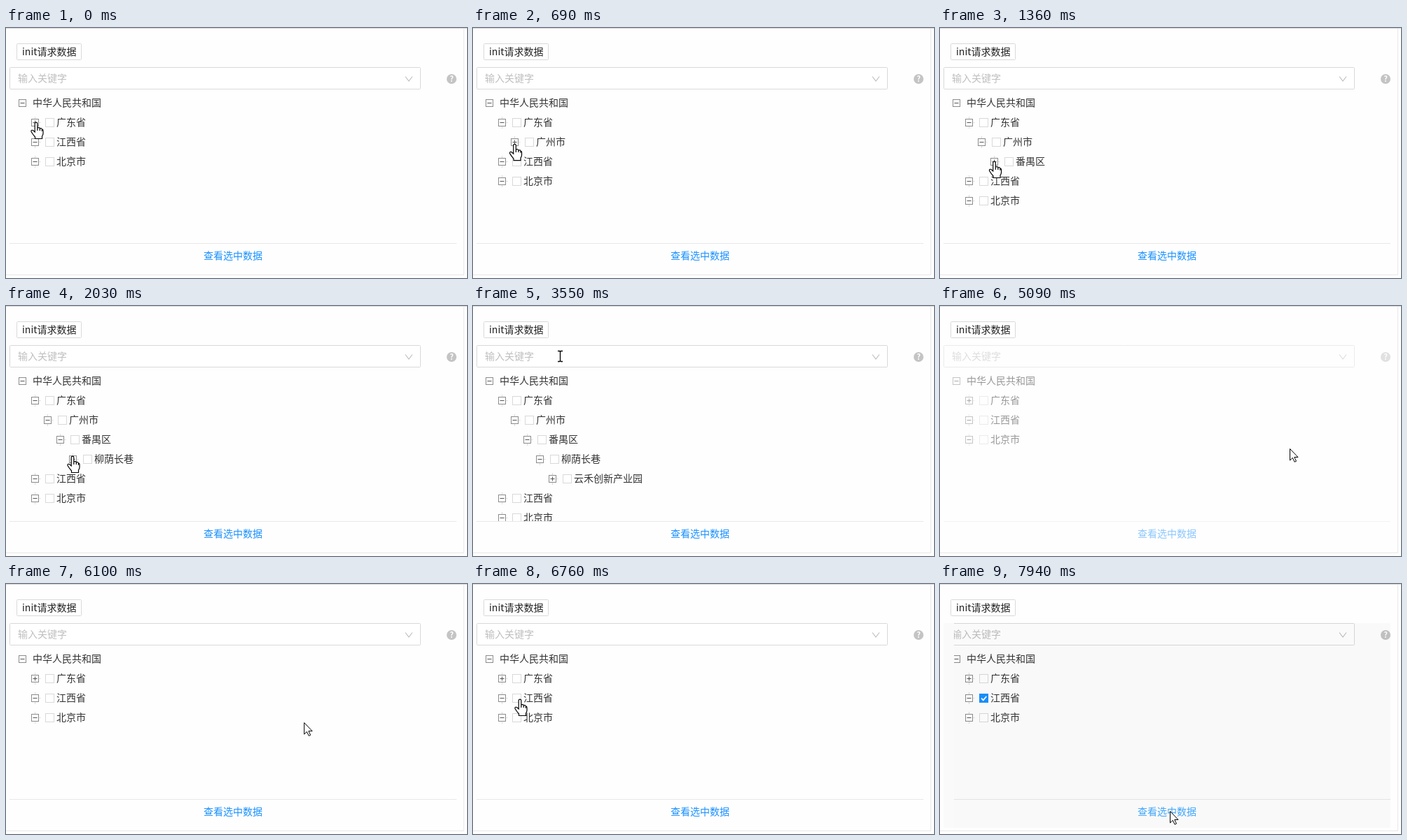
These frames come from a looping animation (658 px wide and 358 px high, 8 s). An HTML page:

```html
<!DOCTYPE html>
<html lang="zh-CN">
<head>
<meta charset="utf-8">
<style>
html, body { margin: 0; width: 100%; height: 100%; overflow: hidden; background: #fefefe; }
svg { display: block; }
text { font: 14px "Noto Sans CJK SC", "Noto Sans CJK", sans-serif; }
</style>
</head>
<body>
<svg id="stage" width="658" height="358"></svg>
<script>
const LOOP = 8000, RESET = 4940, ROW = 28;
const stage = document.getElementById('stage');

// label, depth, time it appears, time its own children appear
const nodes = [
  ['中华人民共和国', 0, -999, -999],
  ['广东省', 1, -999, 130],
  ['广州市', 2, 130, 760],
  ['番禺区', 3, 760, 1620],
  ['柳荫长巷', 4, 1620, 2430],
  ['云禾创新产业园', 5, 2430, Infinity],
  ['江西省', 1, -999, -999],
  ['北京市', 1, -999, -999]
];

// time, x, y, pointer shape
const track = [
  [0, 43, 136, 'hand'], [380, 43, 136, 'hand'], [700, 60, 168, 'hand'],
  [1090, 61, 171, 'hand'], [1360, 77.5, 192, 'hand'], [1610, 77.5, 192, 'hand'],
  [1740, 79, 194, 'hand'], [2030, 95, 216, 'hand'], [3200, 95, 216, 'hand'],
  [3280, 104, 165, 'arrow'], [3430, 116, 105, 'arrow'], [3540, 124.5, 72, 'beam'],
  [3670, 124.5, 72, 'beam'], [3700, 94, 44, 'hand'], [3940, 75, 35, 'hand'],
  [4480, 75, 35, 'hand'], [4560, 140, 62, 'arrow'], [5080, 499.5, 204.5, 'arrow'],
  [6000, 499.5, 204.5, 'arrow'], [6560, 90, 172, 'arrow'], [6700, 67, 166, 'hand'],
  [7030, 67, 166, 'hand'], [7130, 94.5, 177.5, 'arrow'], [7240, 94.5, 177.5, 'arrow'],
  [7480, 310, 290, 'arrow'], [7540, 352, 322, 'hand'], [7670, 328.5, 326, 'hand'],
  [7930, 328.5, 326, 'hand'], [7940, 328.5, 325.5, 'arrow'], [LOOP, 328.5, 325.5, 'arrow']
];

const shapes = {
  arrow: '<path d="M0 0V16.5L3.8 12.9 6.6 18.8 9 17.7 6.3 12H11.5Z"/>',
  hand: '<path d="M-1.8 1Q-1.8-.8 0-.8T1.8 1V7Q5 5.8 5.3 8 8.2 7 8.4 9.2 10 9 10 11V15Q10 17 8.5 19V22.5H-1.5V20Q-5 16-7 12.5-7.5 9.5-4.5 10.5L-1.8 13ZM1.8 7v4M5.3 8v3M8.4 9.2v2.5" stroke-width="1.2"/>',
  beam: '<path d="M-3.5-7.5H-1L0-6.5 1-7.5H3.5M0-6.5V6.5M-3.5 7.5H-1L0 6.5 1 7.5H3.5" fill="none" stroke-width="1.3"/>'
};

const ramp = (t, start, span) => Math.min(1, Math.max(0, (t - start) / span));
const smooth = p => p * p * (3 - 2 * p);
const text = (x, y, s, fill, more = '') => `<text x="${x}" y="${y}" fill="${fill}" ${more}>${s}</text>`;
const rect = (x, y, w, h, more) => `<rect x="${x}" y="${y}" width="${w}" height="${h}" ${more}/>`;
const path = (d, stroke, more = '') => `<path d="${d}" fill="none" stroke="${stroke}" ${more}/>`;

function row([label, depth], y, grown, open, checked) {
  const x = 23.5 + 18 * depth;
  let s = rect(x - 5, 9.5, 10, 10, 'fill="#fff" stroke="#8c8c8c"')
    + path(`M${x - 3} 14.5h6` + (open ? '' : `M${x} 11.5v6`), '#555');
  if (depth) {
    s += path(`M${x} 6v3M${x} 20v3M${x + 6} 14.5h2`, '#d9d9d9')
      + rect(x + 15, 8.5, 12, 12, checked ? 'fill="#1890ff" stroke="#1890ff"' : 'fill="#fff" stroke="#d9d9d9"');
    if (checked) s += path(`M${x + 17.5} 14.5l2.7 2.8 4.6-5.3`, '#fff', 'stroke-width="1.8"');
  }
  s += text(x + (depth ? 30.5 : 14.5), 19, label, '#333');
  return `<svg y="${y}" width="658" height="${ROW * grown}" opacity="${grown}">${s}</svg>`;
}

function tree(t) {
  const clock = t < RESET ? t : 0;
  let y = 5, s = '';
  for (const node of nodes) {
    const grown = smooth(ramp(clock, node[2], 200));
    if (!grown) continue;
    s += row(node, y, grown, clock > node[3], node[0] === '江西省' && t >= 7020);
    y += ROW * grown;
  }
  if (t > 2520 && t < 3270) s += rect(637, 0, 6, 207, 'rx="3" fill="#ccc"');
  return `<svg y="88" width="658" height="220">${s}</svg>`;
}

function panel(t) {
  const dim = 1 - 0.5 * smooth(ramp(t, 4440, 300)) + 0.5 * smooth(ramp(t, 5100, 290));
  const link = t > 7520 ? '#40a9ff' : '#1890ff';
  return `<g opacity="${dim}">`
    + rect(5.5, 56.5, 586, 31, 'rx="1" fill="#fff" stroke="#d9d9d9"')
    + text(17, 77, '输入关键字', '#bfbfbf')
    + path('M570 69.5l5 6.5 5-6.5', '#bfbfbf', 'stroke-width="1.2"')
    + '<circle cx="636" cy="73" r="7" fill="#c4c4c4"/>'
    + text(636, 77, '?', '#fff', 'text-anchor="middle" style="font-size:11px;font-weight:700"')
    + tree(t)
    + path('M5 308.5H643', '#e8e8e8')
    + text(324, 331, '查看选中数据', link, 'text-anchor="middle"')
    + '</g>';
}

function button(t) {
  const hover = t > 3690 && t < 4540;
  return rect(15.5, 22.5, 92, 23, `rx="1" fill="#fff" stroke="${hover ? '#40a9ff' : '#d9d9d9'}"`)
    + text(23, 39, 'init请求数据', hover ? '#40a9ff' : '#222');
}

function pointer(t) {
  const i = Math.max(1, track.findIndex(k => k[0] > t));
  const [t0, x0, y0, kind] = track[i - 1], [t1, x1, y1] = track[i];
  const p = ramp(t, t0, t1 - t0);
  return `<g transform="translate(${x0 + (x1 - x0) * p} ${y0 + (y1 - y0) * p})" fill="#fff" stroke="#000">${shapes[kind]}</g>`;
}

function draw(now) {
  const t = now % LOOP;
  let s = path('M0 .5H658', '#d9d9d9') + path('M653.5 1V353.5H0', '#e8e8e8') + button(t) + panel(t);
  if (t >= 7940) {
    s += rect(5, 56, 638, 293, 'fill="#000" opacity=".02"')
      + rect(5, 56, 15, 293, 'fill="#fafafa"');
  }
  stage.innerHTML = s + pointer(t);
}

const start = performance.now();
function tick() {
  draw(performance.now() - start);
  requestAnimationFrame(tick);
}
tick();
</script>
</body>
</html>
```
